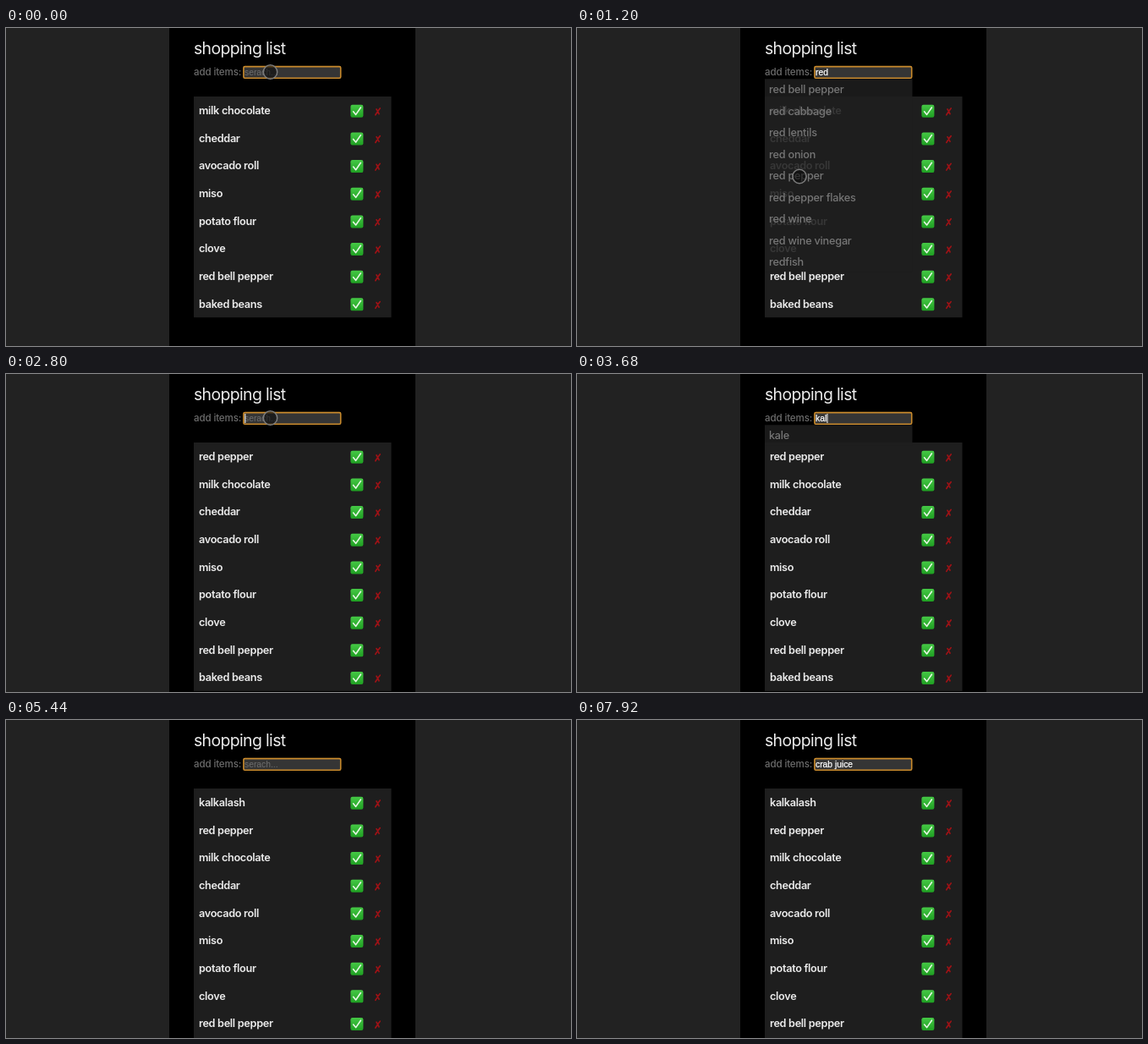
These frames come from a looping animation (668x376 px, 8 s). An HTML page:

```html
<!DOCTYPE html>
<html lang="en">
<head>
<meta charset="utf-8">
<title>Shopping list</title>
<style>
  html, body { margin: 0; width: 100%; height: 100%; overflow: hidden; background: #222; }
  svg { display: block; width: 668px; height: 376px; }
  text { font-family: Inter, sans-serif; font-size: 12.7px; font-weight: 500; letter-spacing: -.22px; white-space: pre; }
  .title { font-size: 19.4px; font-weight: 400; letter-spacing: -.62px; fill: #ececec; }
  .label { font-size: 11.6px; letter-spacing: -.15px; fill: #6c6c6c; }
  .item { font-weight: 600; letter-spacing: -.32px; fill: #ececec; }
  .option { fill: #767676; }
  .field { font-family: "Liberation Sans", Arial, sans-serif; font-size: 10.3px; font-weight: 400; letter-spacing: 0; stroke-width: .25; }
</style>
</head>
<body>
<svg id="stage" viewBox="0 0 668 376">
  <defs>
    <linearGradient id="green" x2="0" y2="1">
      <stop stop-color="#45c845"/><stop offset="1" stop-color="#1f9f22"/>
    </linearGradient>
    <g id="marks">
      <rect x="407.4" y="-7.2" width="15" height="15" rx="2.2" fill="url(#green)"/>
      <path d="M410.6 .8 413.6 4.4 419.4 -4" fill="none" stroke="#e6f7e4" stroke-width="1.6" stroke-linecap="round" stroke-linejoin="round"/>
      <path d="M442.2 -3 Q439.4 .4 436.8 4.8 M438 -2 Q439.8 .8 441 3.6" fill="none" stroke="#9c1216" stroke-width="1.7" stroke-linecap="round"/>
    </g>
  </defs>
  <rect width="668" height="376" fill="#222"/>
  <rect x="193" width="291" height="376" fill="#000"/>
  <text class="title" x="222" y="31.3">shopping list</text>
  <text class="label" x="222" y="56">add items:</text>
  <rect id="panel" x="222" y="81" width="233.5" fill="#1e1e1e"/>
  <g id="rows"></g>
  <rect id="box" x="280.9" y="45.6" width="114.8" height="13.6" rx="1.5" fill="#353535"/>
  <text id="typed" class="field" x="282" y="55.8"></text>
  <rect id="caret" y="47" width="1" height="11" fill="#fff"/>
  <g id="menu">
    <rect id="menuBack" x="222" y="60.3" width="174.5" fill="#1e1e1e" fill-opacity=".88"/>
  </g>
  <circle id="ring" r="8.2" fill="#0c0c0c" fill-opacity=".6" stroke="#7c7c7c" stroke-width="1.5"/>
</svg>
<script>
const LOOP = 8000, ROW = 32.65, OPTION = 25.5;
const $ = id => document.getElementById(id);

const base = ['milk chocolate', 'cheddar', 'avocado roll', 'miso', 'potato flour',
  'clove', 'red bell pepper', 'baked beans'];
const added = [[1280, 'red pepper'], [4880, 'kalkalash']];

const catalog = ['crab', 'crackers', 'cranberries', 'cream', 'cream cheese', 'croissants',
  'kale', 'red bell pepper', 'red cabbage', 'red lentils', 'red onion', 'red pepper',
  'red pepper flakes', 'red wine', 'red wine vinegar', 'redfish', 'refried beans', 'relish'];

// Each word: its key times, and when the field is cleared.
const words = [
  { text: 'red', keys: [80, 160, 320], end: 1280 },
  { text: 'kalkalash', keys: [3040, 3280, 3520, 3920, 4000, 4080, 4160, 4240, 4400], end: 4880 },
  { text: 'crab juice', keys: [6560, 6880, 6960, 7040, 7120, 7360, 7440, 7520, 7600, 7760], end: LOOP }
];
const focus = [[0, 1280], [2320, LOOP]];
const caretOn = [[80, 560], [2320, 2480], [2800, 5280], [5760, 6240], [6480, 7920]];

// Pointer stops: time, x, y
const path = [[0, 312.5, 52], [480, 312.5, 52], [560, 309.5, 58], [1040, 263, 175],
  [1360, 263, 176], [1680, 263, 180], [1840, 266, 172], [2160, 312.5, 52], [3040, 312.5, 52]];

const within = (spans, t) => spans.some(([a, b]) => t >= a && t < b);

function set(el, attrs) {
  for (const k in attrs) el.setAttribute(k, attrs[k]);
  return el;
}

function make(tag, parent, attrs) {
  const el = document.createElementNS('http://www.w3.org/2000/svg', tag);
  parent.append(el);
  return set(el, attrs);
}

const rows = Array.from({ length: 10 }, (_, i) => {
  const g = make('g', $('rows'), { transform: `translate(0 ${98 + i * ROW})` });
  make('use', g, { href: '#marks' });
  return { g, label: make('text', g, { class: 'item', x: 228, y: 4 }) };
});
const options = Array.from({ length: 11 }, (_, i) =>
  make('text', $('menu'), { class: 'option', x: 227, y: 77.2 + i * OPTION }));

function typedAt(t) {
  const w = words.find(w => t >= w.keys[0] && t < w.end);
  return w ? w.text.slice(0, w.keys.filter(k => k <= t).length) : '';
}

function drawList(t) {
  const items = [...base];
  for (const [at, name] of added) if (t >= at) items.unshift(name);
  set($('panel'), { height: items.length * ROW });
  rows.forEach(({ g, label }, i) => {
    g.style.display = items[i] ? '' : 'none';
    label.textContent = items[i] || '';
  });
}

function drawField(t, text) {
  const focused = within(focus, t);
  set($('box'), { stroke: focused ? '#c98a2c' : '#6c6c6c', 'stroke-width': focused ? 1.6 : 1 });
  $('typed').textContent = text || 'serach...';
  set($('typed'), { fill: text ? '#fff' : '#6e6e6e', stroke: text ? '#fff' : 'none' });
  const x = text ? 282.3 + $('typed').getComputedTextLength() : 282.3;
  set($('caret'), { x, opacity: within(caretOn, t) ? 1 : 0 });
}

function drawMenu(text) {
  const hits = text.length > 1 ? catalog.filter(n => n.startsWith(text)) : [];
  $('menu').style.display = hits.length ? '' : 'none';
  set($('menuBack'), { height: Math.max(0, hits.length * OPTION - 1.5) });
  options.forEach((o, i) => o.textContent = hits[i] || '');
}

function drawRing(t) {
  const i = path.findIndex(p => p[0] > t);
  $('ring').style.display = i < 0 ? 'none' : '';
  if (i < 0) return;
  const [t0, x0, y0] = path[i - 1], [t1, x1, y1] = path[i];
  const u = (t - t0) / (t1 - t0), e = u * u * (3 - 2 * u);
  set($('ring'), { cx: x0 + (x1 - x0) * e, cy: y0 + (y1 - y0) * e });
}

function draw(t) {
  const text = typedAt(t);
  drawList(t);
  drawField(t, text);
  drawMenu(text);
  drawRing(t);
}

const start = performance.now();
function tick() {
  draw((performance.now() - start) % LOOP);
  requestAnimationFrame(tick);
}
tick();
</script>
</body>
</html>
```
